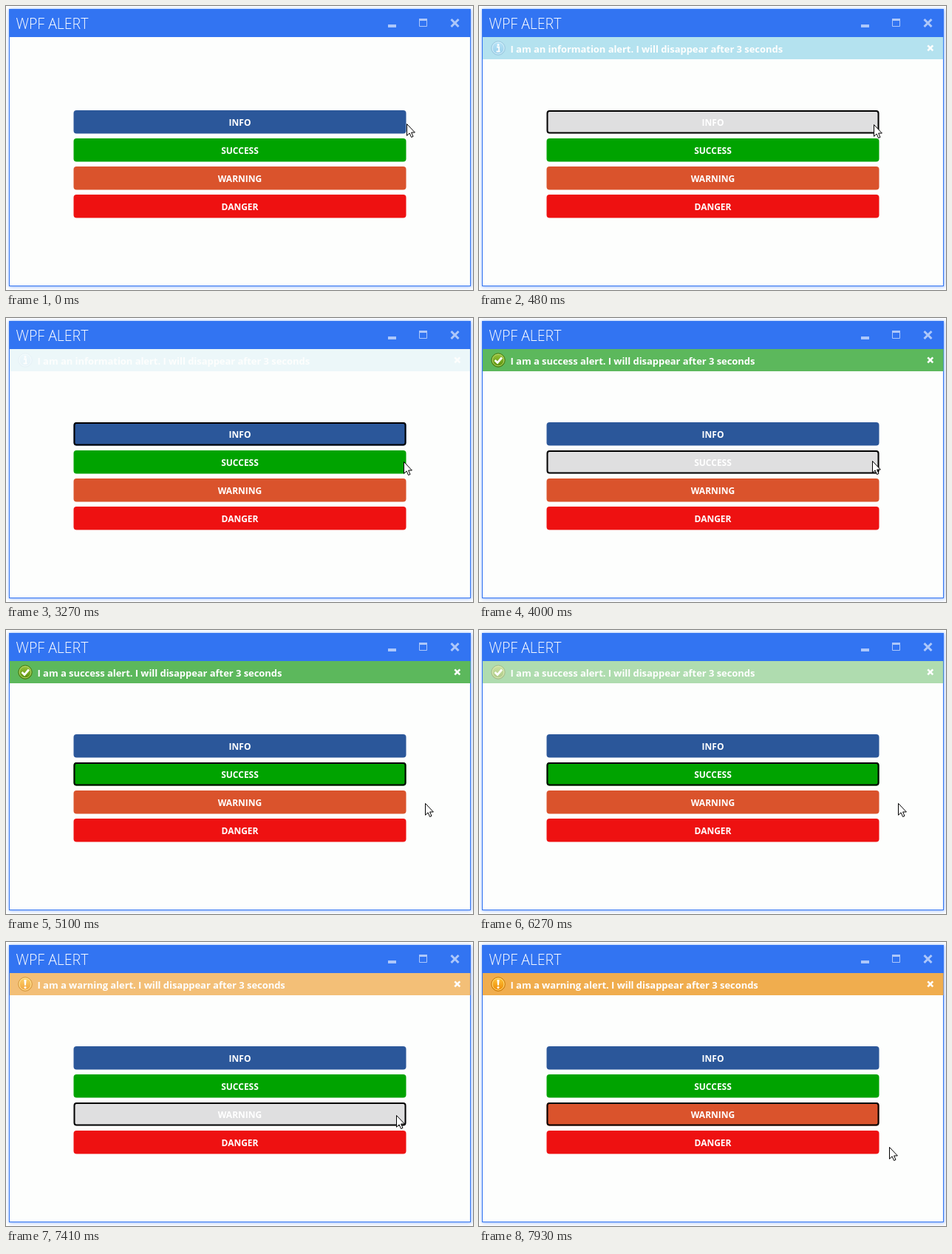
These frames come from a looping animation (632x384 px, 8000 ms). An HTML page:

```html
<!DOCTYPE html>
<html lang="en">
<head>
<meta charset="utf-8">
<title>WPF alert</title>
<style>
  html, body { margin: 0; width: 100%; height: 100%; overflow: hidden; background: #fff; }
  svg { display: block; }
  text { font-family: "Open Sans", "Noto Sans", sans-serif; fill: #fff; }
  .title { font-size: 19.5px; font-weight: 300; }
  .label { font-size: 12px; font-weight: 700; text-anchor: middle; }
  .message { font-size: 13px; font-weight: 700; letter-spacing: -.05px; }
</style>
</head>
<body>
<svg id="stage" width="632" height="384" viewBox="0 0 632 384">
  <defs>
    <filter id="glow" x="-5%" y="-5%" width="110%" height="110%"><feGaussianBlur stdDeviation="2"/></filter>
    <linearGradient id="blue" x2="0" y2="1"><stop stop-color="#62c5f2"/><stop offset="1" stop-color="#1c93d2"/></linearGradient>
    <linearGradient id="green" x2="0" y2="1"><stop stop-color="#9bc63c"/><stop offset="1" stop-color="#558c08"/></linearGradient>
    <linearGradient id="amber" x2="0" y2="1"><stop stop-color="#ffc63a"/><stop offset="1" stop-color="#ec8705"/></linearGradient>
  </defs>
  <rect x="4" y="4" width="626" height="376" fill="#3274f2" opacity=".5" filter="url(#glow)"/>
  <rect x="4.5" y="4.5" width="624" height="374" fill="#fdfefd" stroke="#3274f2"/>
  <rect x="4" y="4" width="625" height="38" fill="#3274f2"/>
  <text class="title" x="13.5" y="31">WPF ALERT</text>
  <g fill="none" stroke="#adc7fa">
    <path d="M517 27h11" stroke-width="4"/>
    <path d="M559.5 18v9.5h10V18"/><path d="M559 18.5h11" stroke-width="3"/>
    <path d="M602.5 18l10 10m0-10l-10 10" stroke-width="3"/>
  </g>
  <g id="buttons"></g>
  <g id="alerts"></g>
  <path id="cursor" d="M.5.5V16.3L4.1 12.9 6.6 18.5 9 17.4 6.6 12H11.4Z" fill="#fff" stroke="#000"/>
</svg>
<script>
const LOOP = 8000, FADE_IN = 250, FADE_START = 2000, FADE_OUT = 1000;
const HOVER = '#dfdfe0';

// shown: click time; hover: span under the pointer
const items = [
  { name: 'INFO', fill: '#2b579a', bar: '#5bc0de', kind: 'an information', shown: 370, hover: [120, 560],
    icon: `<circle r="9.3" fill="url(#blue)" stroke="#2387b8"/><circle r="8" fill="none" stroke="#a5def5"/>
      <path d="M-2-1.5H1V4M-2.5 4.5h5" fill="none" stroke="#fff" stroke-width="1.8"/><circle cy="-4.5" r="1.5" fill="#fff"/>` },
  { name: 'SUCCESS', fill: '#00a300', bar: '#5cb85c', kind: 'a success', shown: 3750, hover: [3290, 4430],
    icon: `<circle r="9.2" fill="url(#green)" stroke="#477713"/><circle r="7.8" fill="none" stroke="#b4d76c"/>
      <path d="M-4.5 0L-1 3.5 5-3.5" fill="none" stroke="#fff" stroke-width="2.8"/>` },
  { name: 'WARNING', fill: '#da532c', bar: '#f0ad4e', kind: 'a warning', shown: 7220, hover: [6760, 7600],
    icon: `<circle r="9.3" fill="url(#amber)" stroke="#c87908"/><circle r="8" fill="none" stroke="#ffdc82"/>
      <path d="M-1.6-6H1.6L.9 1.8H-.9Z" fill="#fff"/><circle cy="4.4" r="1.5" fill="#fff"/>` },
  { name: 'DANGER', fill: '#ee1111' }
];

// time, x, y of the pointer tip
const track = [
  [0, 542, 159], [220, 534, 160], [480, 534, 160], [820, 586, 191], [860, 583, 192], [1100, 569, 201],
  [2850, 569, 201], [3170, 543, 195], [3270, 538, 194], [3480, 533, 194], [3750, 533, 194], [4000, 532, 193],
  [4310, 532, 193], [4680, 567, 230], [4930, 567, 230], [5100, 567, 234],
  [6580, 567, 234], [6860, 528, 234], [7440, 528, 234], [7930, 555, 277], [LOOP, 555, 277]
];

const byId = id => document.getElementById(id);
const clamp = v => Math.min(1, Math.max(0, v));

function addGroup(parent, markup) {
  const g = document.createElementNS('http://www.w3.org/2000/svg', 'g');
  g.innerHTML = markup;
  return parent.appendChild(g);
}

items.forEach((item, i) => {
  const y = 141 + 38 * i;
  const button = addGroup(byId('buttons'), `
    <rect x="91.5" y="${y}" width="450" height="31.5" rx="4"/>
    <rect x="92.5" y="${y + 1}" width="448" height="29.5" rx="3" fill="none" stroke="#000" stroke-width="2"/>
    <text class="label" x="316.5" y="${y + 20.5}">${item.name}</text>`);
  [item.face, item.ring] = button.children;
  if (item.bar) item.alert = addGroup(byId('alerts'), `
    <rect x="5" y="42" width="623.5" height="30" fill="${item.bar}"/>
    <g transform="translate(26 57)">${item.icon}</g>
    <text class="message" x="42.5" y="62.5">I am ${item.kind} alert. I will disappear after 3 seconds</text>
    <path d="M607.3 53.3l7 7m0-7l-7 7" stroke="#fff" stroke-width="2.6"/>`);
});

function pointerAt(t) {
  const k = track.findIndex(p => p[0] > t);
  const [t0, x0, y0] = track[k - 1], [t1, x1, y1] = track[k];
  const u = (t - t0) / (t1 - t0);
  return [x0 + (x1 - x0) * u, y0 + (y1 - y0) * u].map(Math.round);
}

function draw(t) {
  const focused = items.filter(item => item.shown <= t).pop();
  for (const item of items) {
    const { shown, hover } = item;
    const hovered = hover && t >= hover[0] && t < hover[1];
    item.face.setAttribute('fill', hovered ? HOVER : item.fill);
    item.ring.setAttribute('visibility', item === focused ? 'visible' : 'hidden');
    if (!item.alert) continue;
    const age = t - shown;
    item.alert.setAttribute('opacity', clamp(age / FADE_IN) * clamp(1 - (age - FADE_START) / FADE_OUT));
  }
  byId('cursor').setAttribute('transform', `translate(${pointerAt(t)})`);
}

const start = performance.now();
function tick() {
  draw((performance.now() - start) % LOOP);
  requestAnimationFrame(tick);
}
tick();
</script>
</body>
</html>
```
